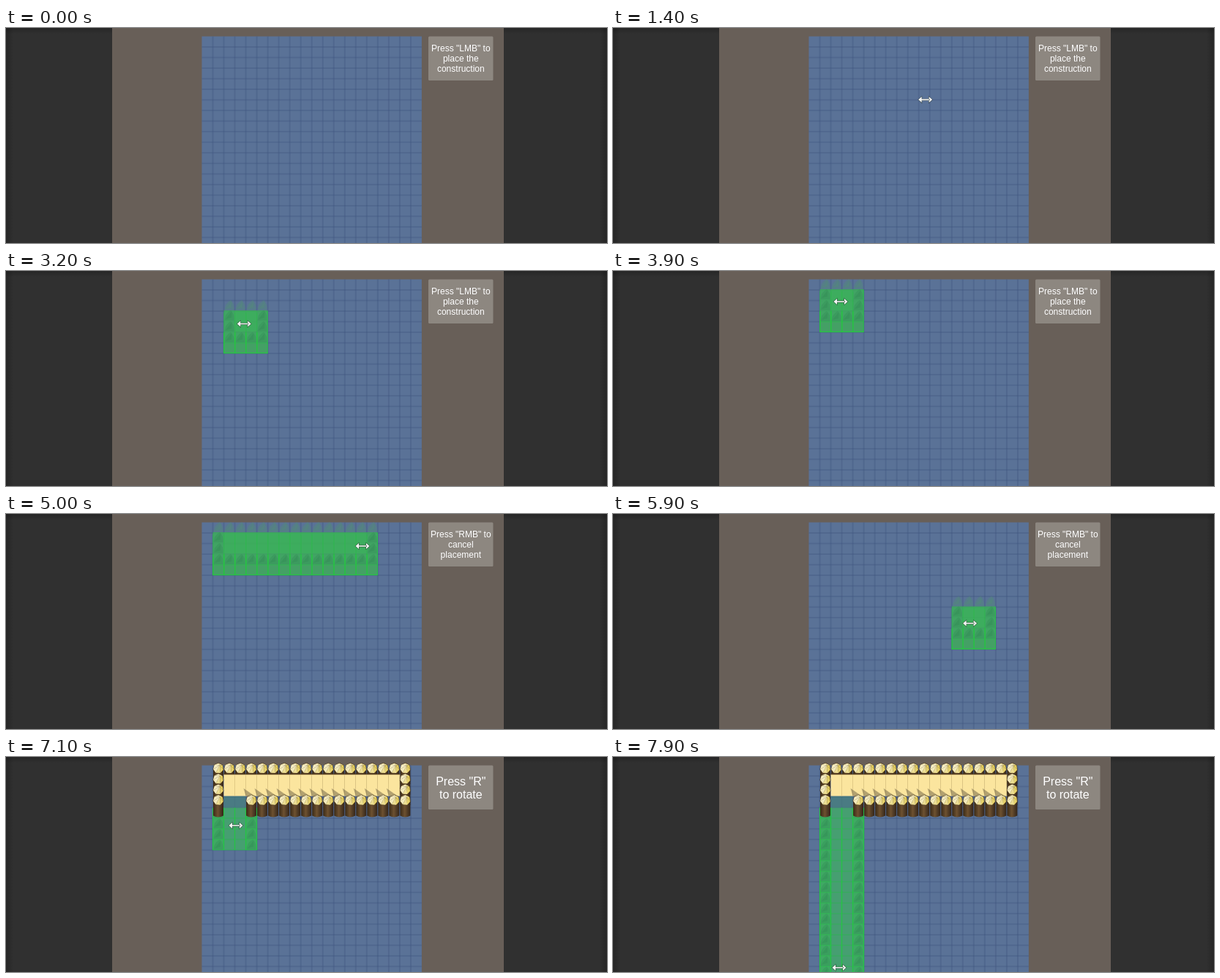
These frames come from a looping animation (821x295 px, 8000 ms). An HTML page with a canvas:

```html
<!DOCTYPE html>
<html lang="en">
<head>
<meta charset="utf-8">
<title>Wall placement</title>
<style>
html, body { margin: 0; width: 100%; height: 100%; overflow: hidden; background: #303030; }
canvas { display: block; }
</style>
</head>
<body>
<canvas id="stage" width="821" height="295"></canvas>
<script>
const g = document.getElementById('stage').getContext('2d');
const LOOP = 8000, STEP = 100;
const X0 = 267.5, Y0 = 11.5, CW = 15.02, CH = 14.52, LIFT = 18;
const FIRST = 1, LAST = 18, TOP = 1, BOTTOM = 4;
const SHOW = 800, SPAWN = 2300, DRAG1 = 4500, BUILD = 5900, HINT3 = 6100;
const ROTATE = 6800, SNAP = 7000, DRAG2 = 7100;
const GROW = 330, STAGGER = 30;

// Pointer moves: where each one ends, and how far it bows downwards
const HOME = { x: 549, y: 86 };
const MOVES = [
  { from: 800, to: 1000, x: 466, y: 109 },
  { from: 1200, to: 1500, x: 407, y: 119, bow: -20 },
  { from: 1700, to: 1900, x: 388, y: 102 },
  { from: 2300, to: 2500, x: 373, y: 98 },
  { from: 2500, to: 3600, x: 298, y: 58 },
  { from: 3700, to: 3900, x: 311, y: 42 },
  { from: 4500, to: 5000, x: 487, y: 44 },
  { from: 5000, to: 5400, x: 537, y: 45 },
  { from: 5500, to: 5700, x: 537, y: 76 },
  { from: 5800, to: 6300, x: 290, y: 152, bow: 100 },
  { from: 6300, to: 6900, x: 314, y: 94 },
  { from: 7100, to: 7600, x: 316, y: 291 },
  { from: 7800, to: 7900, x: 309, y: 289 }
];

const HINTS = [
  { at: -LOOP, size: 12, pitch: 14, base: 32.3, lines: ['Press "LMB" to', 'place the', 'construction'] },
  { at: DRAG1, size: 12, pitch: 14, base: 32.3, lines: ['Press "RMB" to', 'cancel', 'placement'] },
  { at: HINT3, size: 16, pitch: 18.4, base: 38.5, lines: ['Press "R"', 'to rotate'] }
];

const cx = c => X0 + c * CW;
const cy = r => Y0 + r * CH;
const clamp = v => Math.max(0, Math.min(1, v));

function rect(x, y, w, h, color) {
  g.fillStyle = color;
  g.fillRect(x, y, w, h);
}

function poly(color, pts) {
  g.fillStyle = color;
  g.beginPath();
  for (const [x, y] of pts) g.lineTo(x, y);
  g.closePath();
  g.fill();
}

function noise(n) {
  const v = Math.sin(n * 12.9898) * 43758.5453;
  return v - Math.floor(v);
}

function pointer(t) {
  let p = HOME;
  for (const m of MOVES) {
    if (t < m.from) break;
    const k = clamp((t - m.from) / (m.to - m.from));
    p = {
      x: p.x + (m.x - p.x) * k,
      y: p.y + (m.y - p.y) * k + (m.bow || 0) * Math.sin(Math.PI * k)
    };
  }
  return p;
}

function shade(x0, y0, x1, y1, alpha) {
  const s = g.createLinearGradient(x0, y0, x1, y1);
  s.addColorStop(0, `rgba(0,0,0,${alpha})`);
  s.addColorStop(1, 'rgba(0,0,0,0)');
  rect(0, 0, 821, 295, s);
}

function background() {
  rect(0, 0, 821, 295, '#303030');
  shade(0, 0, 10, 0, .22);
  shade(821, 0, 811, 0, .22);
  shade(0, 0, 0, 8, .2);
  rect(145, 0, 535, 295, '#685f58');
  rect(X0, Y0, 20 * CW, 295, '#5a7297');
  for (let i = 1; i < 20; i++) {
    rect(cx(i) - .9, Y0, 1.8, 295, 'rgba(62,84,124,.36)');
    rect(X0, cy(i) - .9, 20 * CW, 1.8, 'rgba(62,84,124,.36)');
  }
}

// Sharpened stake seen from above: facets fanning out from the tip
function head(x, y, s) {
  const sides = 7, tip = [x + 2 * s, y - 4 * s];
  const rim = (i, size) => {
    const a = (i + .3) / sides * 2 * Math.PI;
    return [x + Math.cos(a) * size * s, y + Math.sin(a) * size * s];
  };
  poly('#49351a', Array.from({ length: sides }, (_, i) => rim(i, 7.7)));
  for (let i = 0; i < sides; i++) {
    const a = (i + .8) / sides * 2 * Math.PI;
    const light = 78 - 13 * Math.cos(a - .3) + 4 * Math.sin(i * 3);
    poly(`hsl(50,72%,${Math.min(86, light)}%)`, [tip, rim(i, 7.1), rim(i + 1, 7.1)]);
  }
}

function log(c, r, rise) {
  if (rise <= 0) return;
  const x = cx(c + .5), base = cy(r + 1) - 1.5;
  const y = base - 5.5 - LIFT * rise;
  const s = Math.min(1, .25 + rise * 2.5), w = 7 * s;
  const bark = g.createLinearGradient(x - w, 0, x + w, 0);
  bark.addColorStop(0, '#3a2a17');
  bark.addColorStop(.45, '#6d5130');
  bark.addColorStop(1, '#33251a');
  g.fillStyle = bark;
  g.beginPath();
  g.moveTo(x - w, y + 2);
  g.lineTo(x + w, y + 2);
  g.lineTo(x + w, base - 2);
  g.quadraticCurveTo(x, base + 2, x - w, base - 2);
  g.fill();
  head(x, y, s);
}

// The wall ends rise together, then each long side follows from the left
function grown(c, r, t) {
  const inner = c > FIRST + 1 && c < LAST - 1;
  const wait = inner ? (r === BOTTOM ? 70 : 265) + (c - 3) * STAGGER : 0;
  return clamp((t - BUILD - wait) / GROW);
}

function logs(r, t) {
  for (let c = FIRST; c <= LAST; c++) {
    const end = c === FIRST || c === LAST;
    const gate = t >= SNAP && r === BOTTOM && (c === 2 || c === 3);
    if (gate || !end && r !== TOP && r !== BOTTOM) continue;
    log(c, r, grown(c, r, t));
  }
}

function walkway(t) {
  const y = cy(2) - 16.5, h = 29.5;
  for (let c = FIRST + 1; c < LAST; c++) {
    const side = c === FIRST + 1 || c === LAST - 1;
    if (t < (side ? 6200 : 6480 + (c - 3) * 25)) continue;
    const x = cx(c);
    rect(x, y, CW, h, '#fbe59e');
    rect(x, y - 1.2, CW, 1.4, '#5a4223');
    rect(x + CW - .5, y, 1, h, '#d2b873');
    if (c > 3 && t >= 6600) poly('rgba(105,94,66,.5)', [[x - 3, y + 19], [x + 12, y + h], [x, y + h]]);
  }
}

function wall(t) {
  if (t < BUILD) return;
  logs(TOP, t);
  walkway(t);
  for (let r = TOP + 1; r <= BOTTOM; r++) logs(r, t);
}

function ghostHead(x, y, color) {
  g.fillStyle = color;
  g.beginPath();
  g.moveTo(x - 6.5, y + 7);
  g.quadraticCurveTo(x - 6, y - 3, x + 2, y - 7);
  g.quadraticCurveTo(x + 7, y - 3, x + 6.5, y + 7);
  g.fill();
  poly(color, [[x - 5, y + 5], [x + 3, y - 5], [x + 3, y + 3]]);
}

const DIM = 'rgba(38,120,76,.2)';

function blocked(x, y, h) {
  for (let i = 0; i < 330; i++) {
    rect(x + noise(i + 1) * 14, y + noise(i + 401) * (h - 1), 1, 1.5, i % 2 ? '#9a7238' : '#32cc3c');
  }
}

function ghost(c0, c1, r0) {
  const x = cx(c0), y = cy(r0), w = cx(c1) - x, h = 4 * CH;
  rect(x, y - 1, w, h + 1, 'rgba(58,178,86,.78)');
  rect(x + CW, y, w - 2 * CW, 28, 'rgba(55,192,82,.3)');
  rect(x, y + 44, w, h - 44, 'rgba(76,146,104,.28)');
  for (let c = c0; c < c1; c++) {
    const mid = cx(c + .5), end = c === c0 || c === c1 - 1;
    ghostHead(mid, y - 8, 'rgba(80,140,118,.42)');
    for (let i = end ? 0 : 2; i < 3; i++) ghostHead(mid, y + 6 + i * 15, DIM);
    rect(cx(c) - .3, y + 29, 1.2, h - 29, '#1fce38');
    rect(cx(c) - .3, y + 2, 1, 27, 'rgba(30,208,58,.4)');
    if (c < 0) blocked(cx(c), y, h);
  }
  rect(cx(c1) - 1, y, 1, h, 'rgba(30,210,58,.7)');
  rect(x, y + h - 1.2, w, 1.2, '#27c443');
  rect(x, y + 43.5, w, .8, 'rgba(30,210,58,.35)');
}

function ghostTurned(c0, r0, r1) {
  const x = cx(c0), y = cy(r0), w = 4 * CW, h = cy(r1) - y;
  rect(cx(c0 + 1), y - 16, 2 * CW, 16, 'rgba(66,128,122,.65)');
  rect(x, y, w, h, 'rgba(62,178,98,.7)');
  for (const c of [c0, c0 + 3]) {
    rect(cx(c), y, CW, h, 'rgba(55,180,82,.45)');
    for (let r = r0; r < r1; r++) ghostHead(cx(c + .5), cy(r) + 7, DIM);
  }
  for (let r = r0 + 1; r <= r1; r++) rect(x, cy(r) - .5, w, 1, 'rgba(35,205,65,.4)');
  for (let c = c0; c <= c0 + 4; c++) rect(cx(c) - .6, y, 1.2, h, 'rgba(32,206,62,.85)');
}

function placement(t, p) {
  if (t < SPAWN) return;
  const col = (p.x - X0) / CW, row = (p.y - Y0) / CH;
  const c = Math.round(col - 2.05), r = Math.round(row - 1.3);
  if (t < SPAWN + STEP) ghost(6, 10, 14);
  else if (t >= DRAG2) ghostTurned(FIRST, BOTTOM, Math.max(8, Math.floor(row) + 2));
  else if (t >= ROTATE) ghostTurned(c, r, r + 4);
  else if (t >= DRAG1 && t < BUILD) ghost(FIRST, Math.max(5, Math.floor(col) + 2), TOP);
  else ghost(c, c + 4, r);
}

function cursor({ x, y }) {
  g.beginPath();
  g.rect(x - 6, y - .8, 12, 1.6);
  for (const d of [-1, 1]) {
    g.moveTo(x + d * 9.5, y);
    g.lineTo(x + d * 5, y - 4);
    g.lineTo(x + d * 5, y + 4);
    g.closePath();
  }
  g.lineWidth = 1.2;
  g.strokeStyle = 'rgba(45,60,50,.7)';
  g.stroke();
  g.fillStyle = '#f6f6f6';
  g.fill();
}

function card(hint, dx, alpha) {
  g.globalAlpha = alpha;
  g.fillStyle = 'rgba(215,215,210,.33)';
  g.beginPath();
  g.roundRect(577 + dx, 11.5, 88.5, 60.5, 1.5);
  g.fill();
  g.font = hint.size + 'px "Liberation Sans", Arial, sans-serif';
  g.textAlign = 'center';
  g.fillStyle = '#fff';
  hint.lines.forEach((s, i) => g.fillText(s, 621.3 + dx, hint.base + i * hint.pitch));
  g.globalAlpha = 1;
}

// The outgoing hint slides right and fades under the new one
function hints(t) {
  const i = HINTS.findLastIndex(h => t >= h.at);
  const age = t - HINTS[i].at;
  if (age < 300) {
    g.save();
    g.beginPath();
    g.rect(145, 0, 535, 295);
    g.clip();
    card(HINTS[i - 1], age * .075, 1 - age / 300);
    g.restore();
  }
  card(HINTS[i], 0, 1);
}

function draw(now) {
  const t = Math.floor((now % LOOP) / STEP) * STEP;
  const p = pointer(t);
  const layers = [() => wall(t), () => placement(t, p)];
  if (t >= ROTATE) layers.reverse();
  background();
  layers.forEach(f => f());
  hints(t);
  if (t >= SHOW) cursor(p);
}

const begin = performance.now();
function tick() {
  draw(performance.now() - begin);
  requestAnimationFrame(tick);
}
tick();
</script>
</body>
</html>
```
